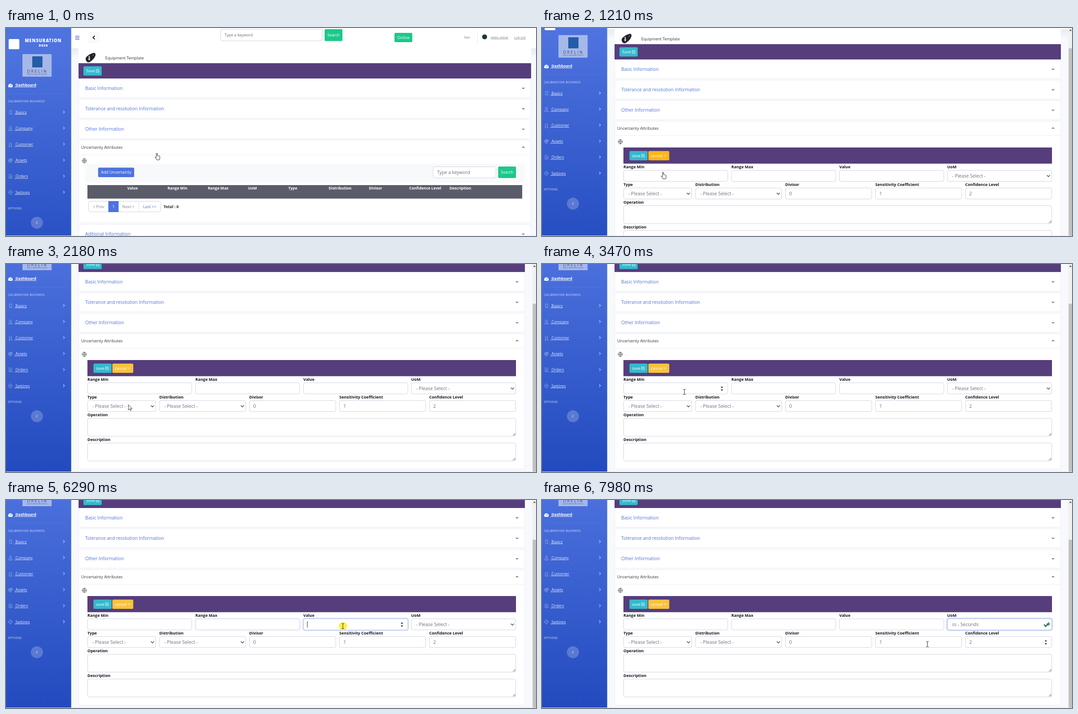
An HTML page for the animation above (8000 ms loop, 1191 by 470 pixels).

```html
<!DOCTYPE html>
<html lang="en">
<head>
<meta charset="utf-8">
<title>Equipment template</title>
<style>
html, body { margin: 0; width: 100%; height: 100%; overflow: hidden; background: #f8f9fc; }
svg { display: block; width: 1191px; height: 470px; font-family: "Open Sans", "Noto Sans", sans-serif; white-space: pre; }
</style>
</head>
<body>
<svg id="stage" viewBox="0 0 1191 470"></svg>
<script>
const LOOP = 8000, SCROLL = 96;
const BLUE = '#4e73df', GREEN = '#1cc88a', TEAL = '#36b9cc', PURPLE = '#563d7c', INK = '#33363d', GREY = '#6e707e', LINE = '#d1d3e2';

// Drawing helpers: text is placed by its vertical centre
const rect = (x, y, w, h, fill, r = 0, more = '') =>
  `<rect x="${x}" y="${y}" width="${w}" height="${h}" rx="${r}" fill="${fill}" ${more}/>`;
const text = (x, y, str, size, fill, more = '') =>
  `<text x="${x}" y="${y + size * .36}" font-size="${size}" fill="${fill}" ${more}>${str}</text>`;
const line = (d, stroke, width = 1, more = '') =>
  `<path d="${d}" fill="none" stroke="${stroke}" stroke-width="${width}" ${more}/>`;
const dot = (x, y, r, fill) => `<circle cx="${x}" cy="${y}" r="${r}" fill="${fill}"/>`;
const box = (x, y, w, h) => rect(x, y, w, h, '#fff', 3.5, `stroke="${LINE}"`);
const sideArrow = (x, y, dx, color) => line(`M${x - dx} ${y - 3}l${2 * dx} 3l${-2 * dx} 3`, color, 1.2);
const foldArrow = (x, y, dy) => line(`M${x - 2.6} ${y - dy}l2.6 ${2 * dy}l2.6 ${-2 * dy}`, INK, 1.1);
const floppy = (x, y) => line(`M${x} ${y - 3.5}h5.5l1.5 1.5v5.5h-7zM${x + 2} ${y - 3}v2h3v-2M${x + 1.7} ${y + 3}v-2.5h3.6v2.5`, '#fff', .6);
const BOLD = 'font-weight="700"', UNDER = 'text-decoration="underline"', MID = 'text-anchor="middle"';

function sidebar() {
  const icons = [
    'M8 186.5h5v8h-5z',
    'M6 231.5q0-4 4-4t4 4zM10 222a2.2 2.2 0 1 0 .1 0z',
    'M10 259.5a3 3 0 1 0 .1 0zM8 265l-1.5 3.5h2.5M12 265l1.5 3.5h-2.5',
    'M6 297l8-2M10 294.5v9M7.5 303.5h5M7 297l-2 4h4zM13 296l-2 4h4z',
    'M7 331h4.5l2 2v6.5h-6.5zM8.5 335h3.5M8.5 337h3.5',
    'M10 367.3a4 4 0 1 0 .1 0zM10 370a1.3 1.3 0 1 0 .1 0zM10 366v1.5M10 375.5v1.5M4.8 371.3h1.5M13.7 371.3h1.5'];
  const names = ['Basics', 'Company', 'Customer', 'Assets', 'Orders', 'Settings'];
  const heading = `${BOLD} letter-spacing=".33"`, faint = 'rgba(255,255,255,.5)';
  return rect(0, 0, 146.5, 570, 'url(#blue)')
    + rect(6, 25, 24, 23, '#fff', 2)
    + text(83.5, 29, 'MENSURATION', 9.6, '#fff', `font-weight="800" letter-spacing=".9" ${MID}`)
    + text(84, 39.5, 'DESK', 7.2, '#fff', `font-weight="800" letter-spacing=".7" ${MID}`)
    + rect(37, 59, 65.5, 51, '#a6b8ea')
    + rect(59, 64, 23, 25, '#235ca8')
    + text(70.5, 97.5, 'DRELIN', 8.8, '#3c4a6b', `${MID} letter-spacing="2.6"`)
    + text(70, 104.5, 'QUALITY MEASURING SERVICES', 2.8, '#4c5a80', `${MID} letter-spacing=".2"`)
    + `<path d="M5 131a5 5 0 1 1 10 0q0 2-1 3h-8q-1-1-1-3z" fill="#fff"/>` + line('M10 131.5l2-4', BLUE, 1.2)
    + text(19, 129, '\u00a0Dashboard', 8.6, '#fff', `${BOLD} ${UNDER}`)
    + line('M10 148.5H136', 'rgba(255,255,255,.06)')
    + text(4, 166, 'CALIBRATION BUSINESS', 6.5, faint, heading)
    + names.map((name, i) => {
        const y = 190.5 + 36.2 * i;
        return line(icons[i], 'rgba(255,255,255,.4)', 1)
          + text(19, y, '\u00a0' + name, 8.7, 'rgba(255,255,255,.88)', UNDER)
          + sideArrow(130, y - .5, 1.5, 'rgba(255,255,255,.65)');
      }).join('')
    + text(4, 408, 'OPTIONS', 6.5, faint, heading)
    + dot(69.5, 440, 13.6, 'rgba(255,255,255,.22)')
    + sideArrow(69.5, 440, -1.2, 'rgba(255,255,255,.65)');
}

// d is the width taken by the scrollbar
function page(d, body) {
  const R = 1180 - d, W = R - 163, s = d / 2, o = d * .78;
  const frame = (y, h) => rect(163.5, y + .5, W - 1, h, '#fff', 4, 'stroke="#eceef4"');
  const card = (y, title) => frame(y, 43) + text(178, y + 22, title, 10.24, BLUE) + foldArrow(R - 17.5, y + 22, 1.2);
  const bottom = d ? 559 : 440;
  return rect(147, 46, 1044, 22, 'url(#shade)')
    + rect(147, 0, 1044, 45.5, '#fff')
    + line('M155.5 18.5h9.5M155.5 22h9.5M155.5 25.5h9.5', BLUE, 1.3)
    + rect(185, 9, 25, 25, '#f8f9fa', 3) + line('M199.5 17.5l-4 4 4 4', '#111', 1.8)
    + box(482.5 - s, 2.5, 228, 26.5) + text(491 - s, 16, 'Type a keyword', 8.8, GREY)
    + rect(716 - s, 2.5, 40, 27, GREEN, 2) + text(736 - s, 16, 'Search', 8.9, '#fff', MID)
    + rect(873 - o, 11, 40, 21, GREEN, 2.5) + text(893 - o, 21.5, 'Online', 9.1, '#fff', MID)
    + text(1029 - d, 21, 'Test', 7, GREY)
    + line(`M${1059.5 - d} 8V35`, '#e6e8ef')
    + dot(1075.5 - d, 20, 5.6, d ? '#0f4d17' : '#1b3a2a')
    + text(1089 - d, 21, 'Hello, elina!', 7.3, '#787a8a', UNDER)
    + text(1142 - d, 21.5, 'Log out', 7.3, '#787a8a', UNDER)
    + rect(163, 46, W, 34, '#fff')
    + '<path d="M180 66q8-8 17-10 5 0 4 6-3 9-13 15-5 2-8-3-2-4 0-8z" fill="#23232b"/>'
    + dot(187, 64.5, 1.5, '#ddd') + rect(185.4, 66.5, 3.2, 6.5, '#ddd', 1.2) + dot(196, 61, 1.3, '#777')
    + text(223, 68, 'Equipment Template', 8.95, INK)
    + rect(163, 79.5, W, 34.5, PURPLE)
    + rect(174, 86.5, 41, 21, TEAL, 2.5) + text(180, 97, 'Save', 9.2, '#fff') + floppy(202.5, 97)
    + card(114, 'Basic Information') + card(160.3, 'Tolerance and resolution Information') + card(206.6, 'Other Information')
    + frame(253, bottom - 253)
    + text(169, 270, 'Uncertainty Attributes', 9.05, INK)
    + foldArrow(R - 17.5, 269.5, -1.2)
    + line(`M164 286.5H${R - 1}`, '#eceef4')
    + line('M176 295a5 5 0 1 0 .1 0zM176 295q-5 5 0 10q5-5 0-10M171 300h10M176 295v10', '#333', .7)
    + body
    + card(bottom + 3.5, 'Aditional Information');
}

function table() {
  const heads = ['Value', 'Range Min', 'Range Max', 'UoM', 'Type', 'Distribution', 'Divisor', 'Confidence Level', 'Description'];
  return rect(177, 307, 989, 42.5, '#f8f9fb')
    + rect(207, 315.5, 81, 21.5, BLUE, 2.5, 'id="add"') + text(247.5, 326, 'Add Uncertainty', 9.1, '#fff', MID)
    + box(960, 313.5, 141, 25) + text(968.5, 326.5, 'Type a keyword', 10.3, GREY)
    + rect(1106, 313, 40, 26, GREEN, 2) + text(1126, 326, 'Search', 8.9, '#fff', MID)
    + rect(183, 355, 977, 30.5, '#5a5c69')
    + heads.map((h, i) => text(272.5 + 90.5 * i, 362, h, 8.5, '#fff', BOLD)).join('')
    + box(185.5, 391.5, 162, 24)
    + line('M298.5 392v23', '#dddfeb')
    + rect(230, 391, 23, 25, BLUE)
    + text(208, 404, '&lt; Prev', 9.1, '#858796', MID) + text(241.5, 404, '1', 9.1, '#fff', MID)
    + text(275, 404, 'Next &gt;', 9.1, '#858796', MID) + text(323, 404, 'Last &gt;&gt;', 9.1, BLUE, MID)
    + text(354, 404, 'Total : 0', 8.9, '#212529', BOLD);
}

// label, x, y, width, height, kind, value
const PICK = '- Please Select -';
const fields = [
  ['Range Min', 183, 364, 235, 26, 'number', ''],
  ['Range Max', 425.5, 364, 235, 26, 'number', ''],
  ['Value', 668, 364, 235.5, 26, 'number', ''],
  ['UoM', 910.5, 364, 235.5, 26, 'select', PICK],
  ['Type', 183, 404, 154, 26, 'select', PICK],
  ['Distribution', 344.5, 404, 194.5, 26, 'select', PICK],
  ['Divisor', 546.5, 404, 195, 26, 'number', '0'],
  ['Sensitivity Coefficient', 749, 404, 194.5, 26, 'number', '1'],
  ['Confidence Level', 951, 404, 195, 26, 'number', '2'],
  ['Operation', 183, 444, 963, 41.5, 'area', ''],
  ['Description', 183, 500, 963, 41.5, 'area', '']
].map(([label, x, y, w, h, kind, value]) => ({ label, x, y, w, h, kind, value }));

function field({ label, x, y, w, h, kind, value }, i) {
  const r = x + w, m = y + h / 2 + .5;
  let out = text(x, y - 7, label, 9, '#15171a', BOLD)
    + rect(x - .5, y - .5, w + 1, h + 1, 'none', 4.5, `id="ring${i}" stroke="#cdd7f7" stroke-width="3"`)
    + box(x + .5, y + .5, w - 1, h - 1)
    + rect(x + .5, y + .5, w - 1, h - 1, 'none', 3.5, `id="edge${i}" stroke="#bac8f3"`)
    + text(x + (kind == 'select' ? 11 : 9), m, value, 10.5, GREY, `id="value${i}"`);
  if (kind == 'select') out += line(`M${r - 11.5} ${m - 2}l3.5 3.5l3.5-3.5`, '#343a40', 1.3);
  if (kind == 'area') out += line(`M${r - 7} ${y + h - 2}l5.5-5.5M${r - 4} ${y + h - 2}l2.5-2.5`, '#555', 1);
  if (kind == 'number') out += `<path id="spin${i}" fill="#444" d="M${r - 16.5} ${m - 1.8}l2.7-4 2.7 4zM${r - 16.5} ${m + 1.8}l2.7 4 2.7-4z"/>`;
  return out;
}

const options = [PICK, 'ss - Seconds', 'mm - Minutes'];
const form = () => rect(183, 313, 963, 36.5, PURPLE)
  + rect(196.5, 321, 41, 21, TEAL, 2.5) + text(202, 331.5, 'save', 9.1, '#fff') + floppy(223.5, 331.5)
  + rect(239, 321, 47, 21, '#f6c23e', 2.5, 'id="cancel"') + text(244.5, 331.5, 'cancel', 9.1, '#fff')
  + line('M275 329.5l4 4m0-4l-4 4', '#fff', .8)
  + fields.map(field).join('')
  + line('M1128 377.5l4 4 7.5-8.5', '#1a8754', 2.8, 'id="check"')
  + rect(0, 370, 1, 14, '#222', 0, 'id="caret"')
  + '<g id="popup">' + rect(908, 391, 241, 57, 'rgba(0,0,0,.1)', 2) + rect(910, 391, 237, 55, '#fff', 0, 'stroke="#888"')
  + options.map((o, i) => rect(910.5, 391.5 + 18 * i, 236, 18, '#1967d2', 0, `id="row${i}"`)
      + text(914, 400.5 + 18 * i, o, 10.5, GREY, `id="opt${i}"`)).join('') + '</g>';

stage.innerHTML = `<defs>
  <linearGradient id="blue" x2="0" y2="1"><stop offset=".1" stop-color="#4e73df"/><stop offset="1" stop-color="#224abe"/></linearGradient>
  <linearGradient id="shade" x2="0" y2="1"><stop stop-color="#e9ebf1"/><stop offset="1" stop-color="#f8f9fc"/></linearGradient></defs>
  <g id="scroller">${rect(0, 0, 1191, 700, '#f8f9fc')}<g id="before">${page(0, table())}</g><g id="after">${page(14, form())}</g>${sidebar()}</g>
  <g id="bar">${rect(1182.5, 0, 9, 470, '#f1f1f1')}<path d="M1184.5 6.5l3-3.5 3 3.5z" fill="#555"/>${rect(1183.5, 0, 7.5, 470, '#c1c1c1', 0, 'id="thumb"')}</g>
  ${rect(0, 469, 1191, 1, '#e4e7ef')}
  <g id="cursor">${dot(0, 0, 9.3, '#fbf03c').replace('<circle', '<circle id="glow" opacity=".9"')}
  <path id="hand" fill="#fff" stroke="#222" d="M-1.2 1a1.2 1.2 0 0 1 2.4 0V5.5q1.2-.6 2 .3 1.3-.5 2 .5 1.5-.2 1.5 1.2V11q0 2-1.2 4H0Q-1.5 12-4 9.3q.3-1.6 2.8.2z"/>
  <path id="arrow" fill="#fff" stroke="#222" stroke-width=".9" d="M0 0V12L2.8 9.3 4.6 13.4 6.4 12.6 4.7 8.7H8.4Z"/>
  ${line('M-2.8-6Q0-6 0-4.5V4.5Q0 6-2.8 6M2.8-6Q0-6 0-4.5M2.8 6Q0 6 0 4.5', '#222', 1, 'id="beam"')}</g>`;

const $ = id => document.getElementById(id);
const show = (id, on) => $(id).setAttribute('visibility', on ? 'inherit' : 'hidden');
const set = (id, name, v) => $(id).setAttribute(name, v);
const clamp = v => Math.max(0, Math.min(1, v));
const easeOut = (v, power) => 1 - (1 - clamp(v)) ** power;
const inside = (x, y, b) => x >= b.x && x <= b.x + b.w && y >= b.y && y <= b.y + b.h;

// Cursor stops: time, x, y
const path = [[70, 339, 283], [620, 272, 326], [1900, 272, 326], [2180, 275, 318], [2380, 275, 318],
  [3130, 328, 312], [3200, 328, 312], [3380, 322, 291], [3470, 320, 289], [3600, 320, 283], [4200, 320, 283],
  [4540, 533, 278], [5080, 533, 278], [5600, 810, 316], [5680, 810, 316], [5950, 757, 285], [6400, 757, 285],
  [6780, 1020, 283], [7100, 1020, 283], [7450, 1010, 322], [7860, 1010, 322], [7912, 985, 324], [7980, 866, 326]];
const clicks = [[650, 800], [3795, 3935], [4875, 5070], [6210, 6390], [6850, 6960], [7600, 7740]];
const focus = [[3795, 0], [4872, 1], [6210, 2], [6870, 3], [LOOP + 999, -1]];

function cursorAt(t) {
  const i = path.findIndex(p => p[0] > t);
  if (i < 1) return path[i ? path.length - 1 : 0].slice(1);
  const [t0, x0, y0] = path[i - 1], [t1, x1, y1] = path[i];
  const u = (t - t0) / (t1 - t0), k = u * u * (3 - 2 * u);
  return [x0 + (x1 - x0) * k, y0 + (y1 - y0) * k];
}

function draw(t) {
  const opened = t >= 815, popup = t >= 6950 && t < 7760, chosen = t >= 7900;
  const scroll = Math.round(SCROLL * easeOut((t - 1150) / 340, 3));
  set('scroller', 'transform', `translate(0 ${-scroll})`);
  show('before', !opened); show('after', opened); show('bar', opened);
  set('thumb', 'y', 10 + scroll * .83);

  // Hover reacts slightly after the cursor, and only once scrolling is over
  const [x, y] = cursorAt(t), [hx, hy] = cursorAt(t - 75);
  const py = hy + (t < 1450 ? 0 : SCROLL);
  const over = opened && !popup ? fields.findIndex(f => inside(hx, py, f)) : -1;
  const onAdd = !opened && inside(hx, py, { x: 207, y: 316, w: 81, h: 21 });
  const onButton = opened && inside(hx, py, { x: 196, y: 321, w: 90, h: 21 });
  const onHeader = inside(hx, py, { x: 163, y: 253, w: 1000, h: 33 });
  const shape = onAdd || onButton || onHeader ? 'hand' : over >= 0 && fields[over].kind != 'select' ? 'beam' : 'arrow';
  ['hand', 'beam', 'arrow'].forEach(s => show(s, s == shape));
  set('cursor', 'transform', `translate(${x} ${y})`);
  show('glow', clicks.some(([a, b]) => t >= a && t < b));
  set('add', 'fill', onAdd ? '#2e59d9' : BLUE);
  const hot = clamp((t - 820) / 130) - clamp((t - 1450) / 150);
  set('cancel', 'fill', `rgb(${248 + 4 * hot},${194 - 12 * hot},${62 - 40 * hot})`);

  fields.forEach((f, i) => {
    const k = focus.findIndex(p => p[1] == i);
    const glow = k < 0 ? 0 : easeOut((t - focus[k][0]) / 150, 2) - easeOut((t - focus[k + 1][0]) / 150, 2);
    set('ring' + i, 'opacity', glow); set('edge' + i, 'opacity', glow);
    if (f.kind == 'number') show('spin' + i, over == i);
  });
  const active = focus.filter(p => p[0] <= t).pop();
  show('caret', opened && active && active[1] < 3 && (t - active[0]) % 1060 < 530);
  if (active) set('caret', 'x', fields[active[1]].x + 8.7);

  show('popup', opened && popup);
  const row = Math.max(0, Math.floor((hy - 295) / 18));
  options.forEach((o, i) => {
    show('row' + i, opened && popup && row == i);
    set('opt' + i, 'fill', row == i ? '#fff' : GREY);
  });
  $('value3').textContent = options[chosen ? 1 : 0];
  show('check', chosen);
}

const start = performance.now();
function tick() {
  draw((performance.now() - start) % LOOP);
  requestAnimationFrame(tick);
}
tick();
</script>
</body>
</html>
```
